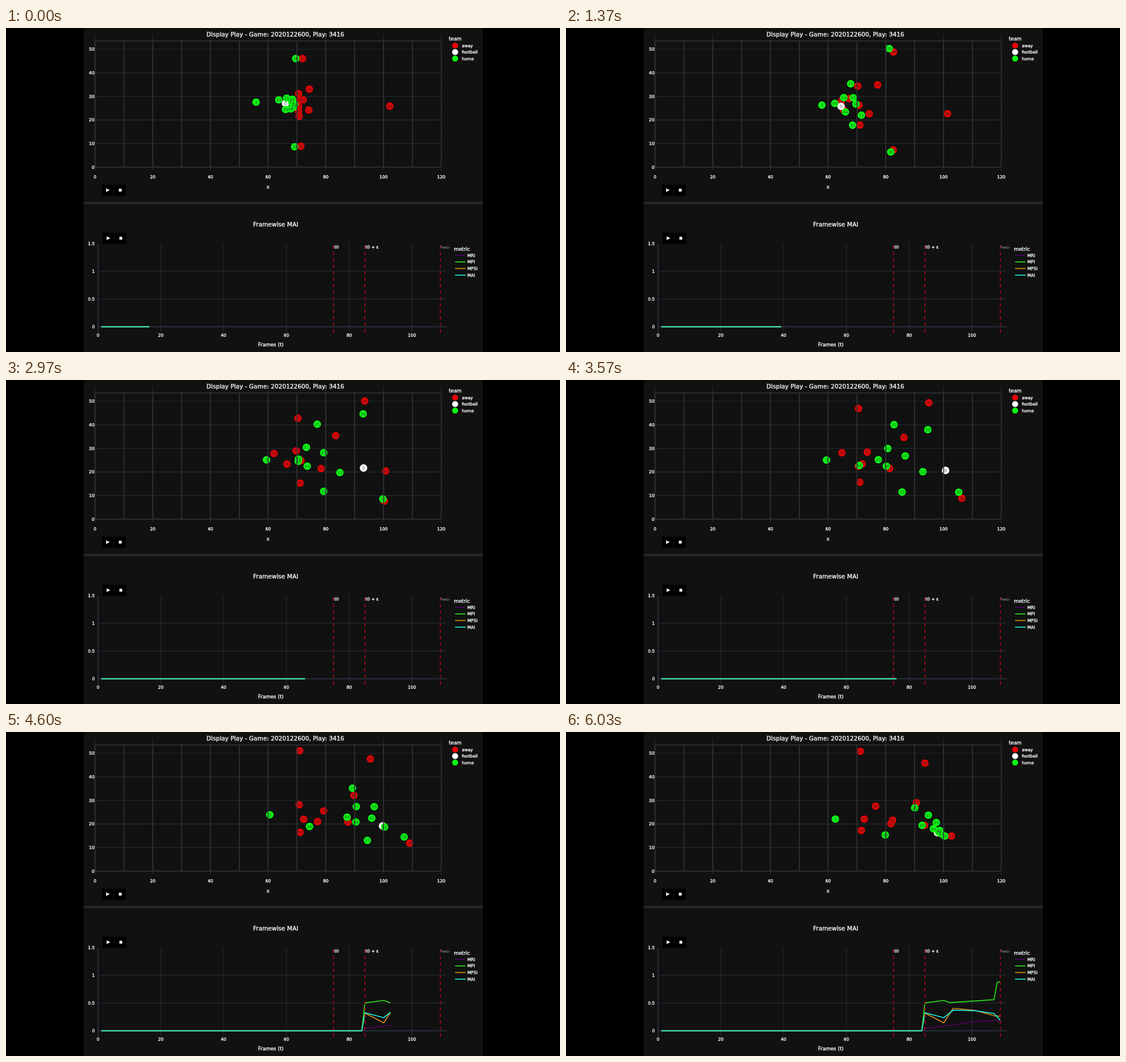
An HTML page with a canvas that plays this animation: 977x573 px, repeating every 6.06 s.

```html
<!DOCTYPE html>
<html lang="en">
<head>
<meta charset="utf-8">
<title>Display Play</title>
<style>
html, body { margin: 0; width: 977px; height: 573px; overflow: hidden; background: #000; }
canvas { display: block; }
</style>
</head>
<body>
<canvas id="stage" width="977" height="573"></canvas>
<script>
const ctx = document.getElementById("stage").getContext("2d");
const LOOP = 6060, END = 5.55;
const CATCH_SNAP = .4, KICK = .95, CATCH_KICK = 3.4;
const SANS = 'Verdana, "DejaVu Sans", sans-serif';
const INK = "#f4f5f8", GRID = "#252a31", AXIS = "#283442", YARD = "#343438";
const COLORS = { away: "#e20404", football: "#fff", home: "#0cfb14" };

// Where each player is at the line-up, in coverage, at the catch and at the whistle.
const KEYS = [0, 2.17, 4.17, END];
const player = (label, ...spots) => ({ label, spots });

const returner = player("84", [677,138], [670,160], [668,161], [655,178]);
const punter = player("3", [441,131], [458,140], [461,143], [475,154]);
const away = [
  player("29", [523,54], [615,36], [644,44], [633,55]),
  player("43", [535,108], [564,97], [608,106], [618,125]),
  player("41", [516,116], [514,88], [517,37], [519,34]),
  player("56", [524,127], [466,131], [502,128], [546,131]),
  player("55", [517,128], [495,124], [549,132], [576,156]),
  player("47", [516,139], [518,137], [524,153], [526,154]),
  player("50", [516,147], [480,145], [535,156], [573,162]),
  player("54", [517,156], [519,181], [518,179], [521,174]),
  player("53", [534,145], [541,156], [587,157], [632,165]),
  returner,
  player("26", [520,209], [624,218], [717,203], [680,184]),
];
const home = [
  punter,
  player("39", [511,54], [611,35], [645,114], [653,160]),
  player("25", [495,124], [517,83], [602,85], [615,134]),
  player("51", [504,131], [494,119], [600,125], [639,147]),
  player("45", [505,126], [521,124], [630,142], [659,174]),
  player("49", [481,127], [482,138], [582,144], [628,165]),
  player("44", [502,143], [499,152], [596,154], [648,171]),
  player("52", [507,140], [544,163], [660,163], [662,180]),
  player("48", [509,135], [514,137], [523,159], [563,182]),
  player("35", [493,144], [525,190], [621,197], [657,177]),
  player("38", [509,210], [623,221], [709,189], [668,184]),
];

// Turning points as [frame, value]; every metric is zero up to frame 84.
const metrics = [
  ["MRI", "#500060", [[85,.04], [102,.17], [109,.19]]],
  ["MPI", "#2be31c", [[85,.5], [91,.545], [93,.505], [107,.56], [108,.87], [109,.885]]],
  ["MPSI", "#d48a12", [[85,.32], [91,.14], [94,.405], [101,.365], [107,.27], [109,.26]]],
  ["MAI", "#1fecd8", [[85,.325], [91,.235], [94,.37], [101,.36], [107,.31], [109,.19]]],
];

const frameX = f => 162.4 + f * 5.536;
const valueY = v => 528.3 - v * 98.2;
const mix = (a, b, u) => a.map((v, i) => v + (b[i] - v) * u);

// Smooth run through the key spots, starting and ending at rest.
function position({ spots }, t) {
  const last = KEYS.length - 1;
  let i = 0;
  while (i < last - 1 && t > KEYS[i + 1]) i++;
  const h = KEYS[i + 1] - KEYS[i], u = (t - KEYS[i]) / h, v = 1 - u;
  return [0, 1].map(axis => {
    const at = k => spots[k][axis];
    const slope = k => k % last === 0 ? 0
      : (at(k + 1) - at(k - 1)) / (KEYS[k + 1] - KEYS[k - 1]) * h;
    return v * v * (1 + 2 * u) * at(i) + u * u * (3 - 2 * u) * at(i + 1)
      + u * v * v * slope(i) - u * u * v * slope(i + 1);
  });
}

// Snapped to the punter, held, kicked to the returner, then carried.
function ballPosition(t) {
  if (t < CATCH_SNAP) return mix([493, 133], position(punter, CATCH_SNAP), t / CATCH_SNAP);
  if (t < KICK) return position(punter, t);
  if (t < CATCH_KICK) {
    const u = (t - KICK) / (CATCH_KICK - KICK);
    return mix(position(punter, KICK), position(returner, CATCH_KICK), u);
  }
  return position(returner, t);
}

function line(x1, y1, x2, y2, color, width = 1.2, dash = []) {
  ctx.strokeStyle = color;
  ctx.lineWidth = width;
  ctx.setLineDash(dash);
  ctx.beginPath();
  ctx.moveTo(x1, y1);
  ctx.lineTo(x2, y2);
  ctx.stroke();
  ctx.setLineDash([]);
}

function text(str, x, y, size, align = "left") {
  ctx.font = `${size}px ${SANS}`;
  ctx.textAlign = align;
  ctx.fillStyle = ctx.strokeStyle = INK;
  ctx.lineWidth = .4;
  ctx.fillText(str, x, y + size * .36);
  ctx.strokeText(str, x, y + size * .36);
}

function disc(x, y, r, color) {
  ctx.fillStyle = color;
  ctx.beginPath();
  ctx.arc(x, y, r, 0, 2 * Math.PI);
  ctx.fill();
}

function buttons(x, y) {
  ctx.fillStyle = "#000";
  ctx.fillRect(x, y, 20.5, 20);
  ctx.fillRect(x + 22, y, 20.5, 20);
  ctx.fillStyle = INK;
  ctx.beginPath();
  ctx.moveTo(x + 7.5, y + 6.5);
  ctx.lineTo(x + 14, y + 9.7);
  ctx.lineTo(x + 7.5, y + 13);
  ctx.fill();
  ctx.fillRect(x + 30, y + 7.3, 5, 5);
}

function drawMarkers(team, marks) {
  for (const [, x, y] of marks) disc(x, y, 6.6, COLORS[team]);
  ctx.font = `7.4px ${SANS}`;
  ctx.textAlign = "center";
  ctx.fillStyle = "rgba(30,35,45,.75)";
  for (const [label, x, y] of marks) ctx.fillText(label, x, y + 2.7);
}

function drawField(t) {
  const yardX = n => 157 + n * 50.88;
  for (let n = 0; n <= 5; n++) {
    const y = 246 - n * 41.65;
    line(157, y, 767.5, y, GRID);
    text(n * 10, 156, y, 7.6, "right");
  }
  for (let n = 0; n <= 12; n += 2) {
    line(yardX(n), 11, yardX(n), 252, GRID);
    text(n * 10, yardX(n), 263.5, 7.6, "center");
  }
  for (const y of [23, 246]) line(157, y, 767.5, y, YARD, 1.6);

  const marks = players => players.map(p => [p.label, ...position(p, t)]);
  drawMarkers("away", marks(away));
  drawMarkers("football", [["0", ...ballPosition(t)]]);
  drawMarkers("home", marks(home));
  for (let n = 0; n <= 12; n++) line(yardX(n), 23, yardX(n), 246, YARD, 1.6);

  text("x", 462, 281, 8.7, "center");
  text("Display Play - Game: 2020122600, Play: 3416", 475, 11.5, 10.6, "center");
  text("team", 781, 19, 8.6);
  Object.keys(COLORS).forEach((team, i) => {
    disc(792, 31 + i * 11.5, 5.3, COLORS[team]);
    text(team, 804, 31 + i * 11.5, 7.4);
  });
  buttons(169, 277);
}

function drawMetric(color, points, frame) {
  ctx.strokeStyle = color;
  ctx.lineWidth = 1.7;
  ctx.lineJoin = "round";
  ctx.beginPath();
  ctx.moveTo(frameX(1), valueY(0));
  let [f0, v0] = [1, 0];
  for (const [f, v] of [[84, 0], ...points]) {
    const end = Math.min(f, frame);
    ctx.lineTo(frameX(end), valueY(v0 + (v - v0) * (end - f0) / (f - f0)));
    if (f >= frame) break;
    [f0, v0] = [f, v];
  }
  ctx.stroke();
}

function drawChart(frame) {
  for (let f = 0; f <= 100; f += 20) {
    line(frameX(f), 381, frameX(f), 538, f ? GRID : AXIS, f ? 1.2 : 1.8);
    text(f, frameX(f), 543.5, 7.6, "center");
  }
  for (let v = 0; v <= 1.5; v += .5) {
    if (v < 1.5) line(162.4, valueY(v), 777, valueY(v), v ? GRID : AXIS, v ? 1.2 : 1.8);
    text(v, 156.5, valueY(v), 7.6, "right");
  }
  for (const [, color, points] of metrics) drawMetric(color, points, frame);
  for (const f of [75, 85, 109]) line(frameX(f), 538.5, frameX(f), 381, "#b3081a", 1.7, [5.7, 5.7]);

  text("t0", 579, 387.5, 7.6);
  text("t0 + ε", 634, 387.5, 7.6);
  ctx.fillStyle = "#c8cad0";
  ctx.font = 'italic 8px "Liberation Serif", serif';
  ctx.fillText("t", 767, 388.5);
  ctx.font = 'italic 6px "Liberation Serif", serif';
  ctx.fillText("end,r", 769.5, 389.5);

  text("Frames (t)", 467, 560, 8.8, "center");
  text("Framewise MAI", 475.5, 347.5, 10.6, "center");
  text("metric", 790, 390.5, 8.7);
  metrics.forEach(([name, color], i) => {
    const y = 402 + i * 11.7;
    line(792, y, 810.5, y, color, 1.7);
    text(name, 813.5, y, 7.6);
  });
  buttons(170, 362);
}

function draw(ms) {
  const t = Math.min(ms / 1000, END);
  ctx.fillStyle = "#000";
  ctx.fillRect(0, 0, 977, 573);
  ctx.fillStyle = "#111";
  ctx.fillRect(137, 0, 704, 573);
  ctx.fillStyle = "#282831";
  ctx.fillRect(137, 307.5, 704, 4);
  drawField(t);
  drawChart(Math.min(16.3 + 16.7 * t, 109));
}

const start = performance.now();
function tick() {
  draw((performance.now() - start) % LOOP);
  requestAnimationFrame(tick);
}
tick();
</script>
</body>
</html>
```
